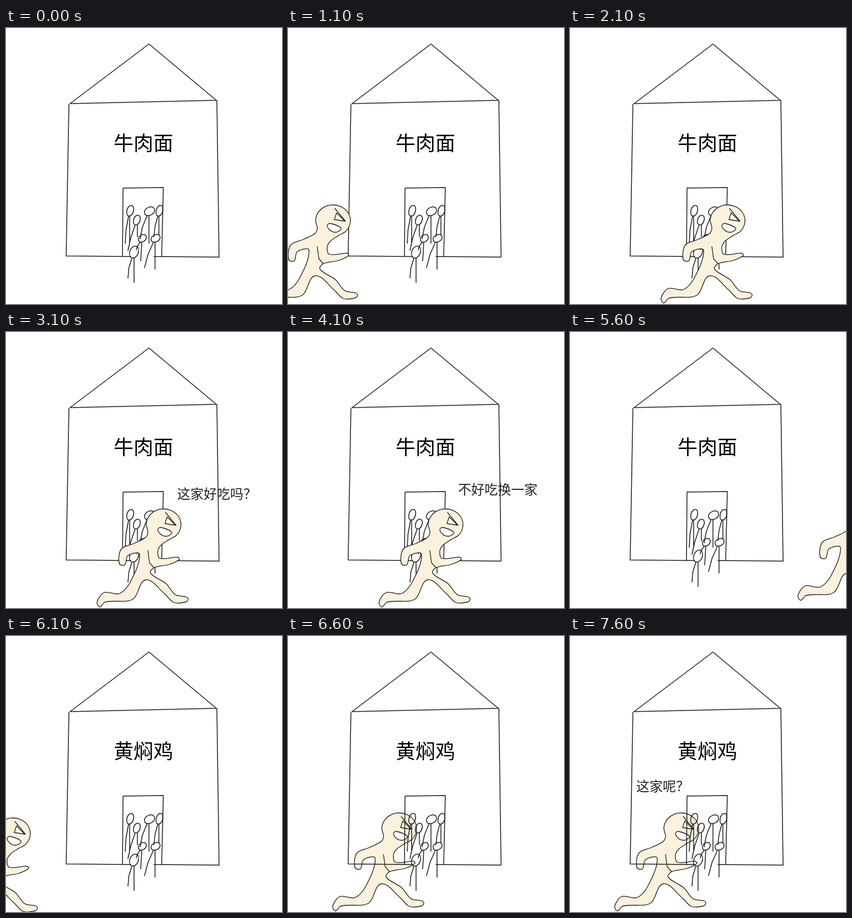
Recreate the animation shown at these times as an HTML page with a canvas. Size 500 px wide and 500 px high, loop 8 s.

```html
<!DOCTYPE html>
<html lang="zh-CN">
<head>
<meta charset="utf-8">
<style>
html, body { margin: 0; width: 100%; height: 100%; overflow: hidden; background: #fff; }
canvas { display: block; width: 500px; height: 500px; }
</style>
</head>
<body>
<canvas id="stage" width="500" height="500"></canvas>
<script>
const ctx = document.getElementById('stage').getContext('2d');
const LOOP = 8000;
const SANS = '"Noto Sans CJK SC", "Noto Sans CJK", sans-serif';

// Points on an ellipse, angles in turns
function oval(cx, cy, rx, ry, from, to, steps, skew = 0) {
  const pts = [];
  for (let i = 0; i <= steps; i++) {
    const a = 2 * Math.PI * (from + (to - from) * i / steps);
    pts.push(cx + rx * (Math.cos(a) - skew * Math.sin(a)), cy + ry * Math.sin(a));
  }
  return pts;
}

const head = oval(285.5, 349, 31.5, 28.5, -0.5, 0.2, 9);
const front = [
  281,386, 275,397, 279,410, 311,408, 314,412, 296,421, 268,427, 262,437,
  290,456, 307,476, 327,480, 330,484, 326,489, 304,490, 287,474, 253,449
];
const back = [
  230,484, 190,488, 178,490, 170,498, 165,489, 178,472, 205,474, 224,455,
  242,403, 221,405, 215,422, 205,419, 209,393, 232,383, 253,372, 257,362
];
const outline = [...head, ...front, ...back];
const armpit = [257,396, 260,418, 268,427];
const brow = [289,327, 308,350];
const eye = [292,335, 288,347, 307,350];
const mouth = [275,358, 280,354, 300,362, 298,367, 290,370, 281,367];

const house = [
  [116,137, 259,29, 381,131, 116,137],
  [114,138, 109,413, 226,414],
  [382,131, 386,415, 268,414],
  [211,414, 212,290, 285,289, 282,414]
];

// Head centre and radii, then the ends of the two legs
const guests = [
  [225,331, 6,10, 216,390, 224,389],
  [237,348, 6,9, 221,403, 238,378],
  [260,332, 9,8, 243,382, 259,390],
  [278,331, 6,10, 268,378, 277,375],
  [247,381, 7,7, 236,402, 244,422],
  [271,381, 8,7, 251,434, 270,437],
  [232,406, 8,11, 221,453, 232,461]
];

// until: end time; at: runner offset; behind: runner under the lines
const scenes = [
  { until: 1100 },
  { until: 2100, at: [-204, 0] },
  { until: 3100, at: [0, 0] },
  { until: 4100, at: [0, 0], say: ['这家好吃吗？', 310, 302] },
  { until: 5100, at: [0, 0], say: ['不好吃换一家', 308, 294] },
  { until: 5600, at: [168, -9] },
  { until: 6100, at: [248, -12] },
  { until: 6600, at: [-273, 9], second: true },
  { until: 7600, at: [-84, 0], second: true, behind: true },
  { until: LOOP, at: [-84, 0], second: true, behind: true, say: ['这家呢？', 120, 281] }
];

function line(pts, closed) {
  ctx.beginPath();
  for (let i = 0; i < pts.length; i += 2) ctx.lineTo(pts[i], pts[i + 1]);
  if (closed) ctx.closePath();
}

// Smooth closed curve; handles scale with each segment to avoid loops
function blob(pts) {
  const n = pts.length / 2;
  const p = i => [pts[2 * ((i + n) % n)], pts[2 * ((i + n) % n) + 1]];
  const handle = (a, b, at, len) => {
    const k = len / (Math.hypot(b[0] - a[0], b[1] - a[1]) || 1);
    return [at[0] + (b[0] - a[0]) * k, at[1] + (b[1] - a[1]) * k];
  };
  ctx.beginPath();
  ctx.moveTo(...p(0));
  for (let i = 0; i < n; i++) {
    const [a, b, c, d] = [p(i - 1), p(i), p(i + 1), p(i + 2)];
    const len = Math.hypot(c[0] - b[0], c[1] - b[1]) * 0.3;
    ctx.bezierCurveTo(...handle(a, c, b, len), ...handle(d, b, c, len), ...c);
  }
  ctx.closePath();
}

function paint(fill) {
  if (fill) {
    ctx.fillStyle = fill;
    ctx.fill();
  }
  ctx.stroke();
}

function drawRunner([dx, dy]) {
  ctx.save();
  ctx.translate(dx, dy);
  ctx.lineWidth = 1.3;
  blob(outline); paint('#fbf1dc');
  line(armpit); paint();
  line(eye, true); paint('#fff');
  line(brow); paint();
  blob(mouth); paint('#fff');
  ctx.restore();
}

function drawGuest([x, y, rx, ry, x1, y1, x2, y2]) {
  blob(oval(x, y, rx, ry, 0, 5 / 6, 5, 0.3)); paint();
  line([x - rx / 2, y + ry, (x + x1 - rx) / 2, (y + ry + y1) / 2, x1, y1]); paint();
  line([Math.max(x - 1, x2), y + ry, x2, y2]); paint();
}

function drawHouse() {
  ctx.lineWidth = 1.5;
  for (const part of house) { line(part); paint(); }
  guests.forEach(drawGuest);
}

function write(text, x, y, font, color) {
  ctx.font = font + ' ' + SANS;
  ctx.fillStyle = color;
  ctx.fillText(text, x, y);
}

function draw(t) {
  const s = scenes.find(scene => t < scene.until);
  ctx.fillStyle = '#fff';
  ctx.fillRect(0, 0, 500, 500);
  ctx.strokeStyle = '#1c1c1c';
  ctx.lineCap = ctx.lineJoin = 'round';
  if (s.at && s.behind) drawRunner(s.at);
  drawHouse();
  if (s.at && !s.behind) drawRunner(s.at);
  write(s.second ? '黄焖鸡' : '牛肉面', 195, 222, '36px', '#000');
  if (s.say) write(...s.say, '300 24px', '#222');
}

const start = performance.now();
function tick() {
  draw((performance.now() - start) % LOOP);
  requestAnimationFrame(tick);
}
tick();
</script>
</body>
</html>
```
